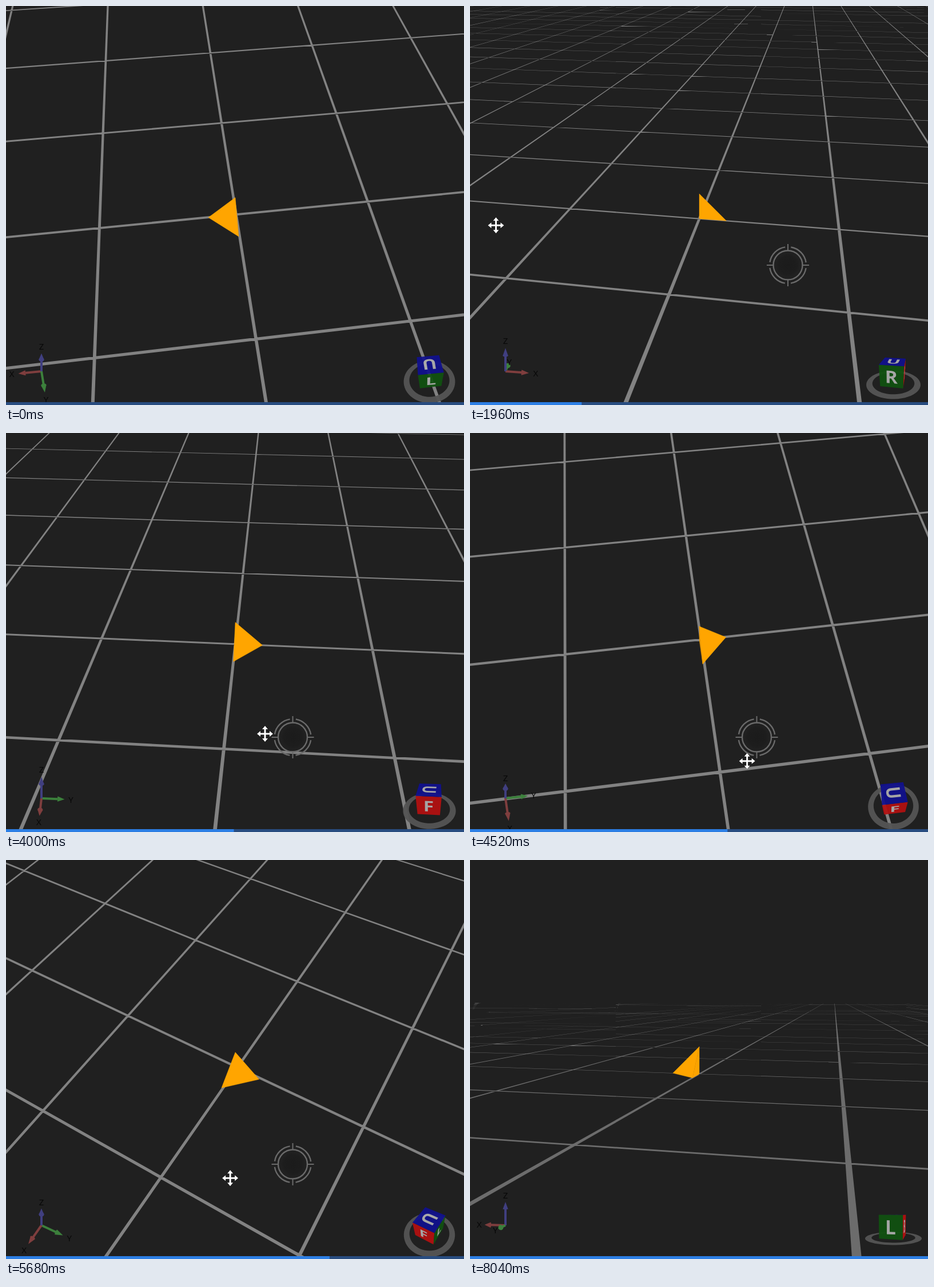
Animation of 801 by 699 pixels, one loop 8080 ms. Source, as an HTML page:

```html
<!DOCTYPE html>
<html lang="en">
<head>
<meta charset="utf-8">
<title>Orbit view</title>
<style>
  html, body { margin: 0; width: 100%; height: 100%; overflow: hidden; background: #202020; }
  svg { display: block; width: 801px; height: 699px; }
  text { font-family: "Noto Sans", "Open Sans", sans-serif; text-anchor: middle; }
  .cube text { font-weight: bold; fill: #b0b0b0; }
</style>
</head>
<body>
<svg viewBox="0 0 801 699">
  <defs>
    <radialGradient id="knob">
      <stop offset="0" stop-color="#1b1b1b"/>
      <stop offset=".75" stop-color="#1d1d1d"/>
      <stop offset="1" stop-color="#1d1d1d" stop-opacity="0"/>
    </radialGradient>
  </defs>
  <rect width="801" height="699" fill="#202020"/>
  <path id="grid"/>
  <g id="solid"></g>
  <g id="triad"></g>
  <path id="ring" fill="#555" fill-rule="evenodd" opacity=".95"/>
  <g id="cube" class="cube" opacity=".93"></g>
  <g id="joystick" fill="none" stroke="#6a6a6a" stroke-width="2.4">
    <circle r="21" fill="url(#knob)" stroke="none"/>
    <circle r="25.5"/>
    <circle r="32" stroke-dasharray="40 10.27" stroke-dashoffset="-5.13"/>
    <path d="M-37 0H-26M26 0H37M0-37V-26M0 26V37" stroke-width="2"/>
  </g>
  <path id="cursor" fill="#fff" stroke="#111" stroke-width="1" paint-order="stroke"
    d="M0-14L5-8H1.5V-1.5H8V-5L14 0L8 5V1.5H1.5V8H5L0 14L-5 8H-1.5V1.5H-8V5L-14 0L-8-5V-1.5H-1.5V-8H-5Z"/>
  <rect y="694" width="801" height="5" fill="#284c80"/>
  <rect id="bar" y="694" height="5" fill="#2c7ee4"/>
</svg>
<script>
const LOOP = 8080, STEP = 40, RAD = Math.PI / 180;
const FOCAL = 964, DISTANCE = 20, CENTER = [401, 351];
const $ = id => document.getElementById(id);

// Each drag: handle position and keys of [time, yaw, pitch, cursor x, cursor y, grid shift].
const drags = [
  { handle: [556, 454], keys: [
    [360, 187.15, 51.1, 556, 454, 1.5],
    [1240, 112.55, 39.6, 363, 422, 2],
    [2060, -14, 24.4, 35, 383, 0]] },
  { handle: [390.5, 459.5], keys: [
    [2480, -14, 24.4, 390, 459, 0],
    [2760, -34.4, 31.7, 337, 478, 0],
    [3260, -75.4, 39.9, 231, 498, 0]] },
  { handle: [501.5, 533], keys: [
    [3680, -75.4, 39.9, 501, 533, 0],
    [4000, -93.9, 37.5, 453, 527, 0],
    [5080, -70.5, 84.9, 520, 628, 6],
    [6520, -201.6, 4.75, 180, 440, 0],
    [6760, -193.65, 6.5, 215, 459, 0]] }
];
const RELEASE = 120;

// Monotone cubic interpolation of one column.
function sample(keys, t, col) {
  const last = keys.length - 1;
  if (t <= keys[0][0]) return keys[0][col];
  if (t >= keys[last][0]) return keys[last][col];
  const slope = i => (keys[i + 1][col] - keys[i][col]) / (keys[i + 1][0] - keys[i][0]);
  const tangent = i => {
    if (i === 0 || i === last) return 0;
    const a = slope(i - 1), b = slope(i);
    return a * b <= 0 ? 0 : 2 * a * b / (a + b);
  };
  let i = 0;
  while (t > keys[i + 1][0]) i++;
  const h = keys[i + 1][0] - keys[i][0], u = (t - keys[i][0]) / h, v = 1 - u;
  return keys[i][col] * v * v * (1 + 2 * u) + keys[i + 1][col] * u * u * (3 - 2 * u)
    + h * u * v * (v * tangent(i) - u * tangent(i + 1));
}

// Returns a function giving [right, up, toward viewer] for a world vector.
function orbit(yaw, pitch) {
  const c = Math.cos(yaw * RAD), s = Math.sin(yaw * RAD);
  const cp = Math.cos(pitch * RAD), sp = Math.sin(pitch * RAD);
  return ([x, y, z]) => {
    const away = x * s + y * c;
    return [x * c - y * s, z * cp + away * sp, z * sp - away * cp];
  };
}

const fix = p => p[0].toFixed(2) + ' ' + p[1].toFixed(2);
const poly = points => 'M' + points.map(fix).join('L') + 'Z';
const area = ([a, b, c]) => (b[0] - a[0]) * (c[1] - a[1]) - (b[1] - a[1]) * (c[0] - a[0]);
const mix = (a, b, k) => a.map((v, i) => v + (b[i] - v) * k);
const sum = (a, b, k) => a.map((v, i) => v + b[i] * k);

function toScreen([r, u, near]) {
  const k = FOCAL / (DISTANCE - near);
  return [CENTER[0] + r * k, CENTER[1] - u * k];
}

function drawGrid(view, shift, pitch) {
  const reach = 250, half = 0.05, clip = DISTANCE - 2;
  const edge = (from, to) => {
    let a = view(from), b = view(to);
    if (a[2] > clip && b[2] > clip) return null;
    if (a[2] > clip) a = mix(a, b, (a[2] - clip) / (a[2] - b[2]));
    else if (b[2] > clip) b = mix(b, a, (b[2] - clip) / (b[2] - a[2]));
    return [toScreen(a), toScreen(b)];
  };
  let d = '';
  for (let k = -reach; k <= reach; k += 5) {
    for (const at of [(along, off) => [along, off, -0.5], (along, off) => [off, along, -0.5]]) {
      const p = edge(at(-reach, k - half), at(reach, k - half));
      const q = edge(at(-reach, k + half), at(reach, k + half));
      if (p && q) {
        const quad = [p[0], p[1], q[1], q[0]];
        d += poly(area(quad) + area([quad[0], quad[2], quad[3]]) > 0 ? quad : quad.reverse());
      }
    }
  }
  const gray = Math.round(106 + 24 * Math.min(1, Math.max(0, (pitch - 5) / 18)));
  $('grid').setAttribute('d', d);
  $('grid').setAttribute('fill', `rgb(${gray},${gray},${gray})`);
  $('grid').setAttribute('transform', `translate(${shift} ${-0.35 * shift})`);
}

function drawSolid(view) {
  const base = [0, 0, -0.5], top = [0, 0, 0.5], x = [1, 0, -0.5], y = [0, 1, -0.5];
  const n = 1 / Math.sqrt(3);
  // Corners, normal and ambient light of each visible face.
  const faces = [
    [[base, y, top], [-1, 0, 0], 0.88],
    [[base, x, top], [0, -1, 0], 0.88],
    [[x, y, top], [n, n, n], 0.78]];
  $('solid').innerHTML = faces.map(([points, normal, ambient]) => {
    const seen = points.map(view), facing = view(normal);
    const eye = sum([0, 0, DISTANCE], seen[0], -1);
    if (facing.reduce((s, v, i) => s + v * eye[i], 0) <= 0) return '';
    const lit = Math.min(1, ambient + 0.45 * facing[2]);
    const color = `rgb(${Math.round(255 * lit)},${Math.round(165 * lit)},0)`;
    return `<path d="${poly(seen.map(toScreen))}" fill="${color}" stroke="${color}" stroke-width=".4"/>`;
  }).join('');
}

function drawTriad(view) {
  const origin = [62, 640], size = 40;
  const axes = [['X', [1, 0, 0], '#7f3e3e'], ['Y', [0, 1, 0], '#3c803c'], ['Z', [0, 0, 1], '#403f80']];
  const items = axes.map(([name, dir, color]) => {
    const v = view(dir);
    const at = k => {
      const s = size * k / (1 - k * v[2] / 3.8);
      return [origin[0] + v[0] * s, origin[1] - v[1] * s];
    };
    const neck = at(0.7), tip = at(1), label = at(1.27);
    const len = Math.hypot(v[0], v[1]) || 1;
    const side = [v[1] / len * 4.6, v[0] / len * 4.6];
    const turn = Math.atan2(-v[1], v[0]) / RAD;
    const cone = poly([tip, sum(neck, side, 1), sum(neck, side, -1)]);
    return { near: v[2], svg:
      `<path d="M${fix(origin)}L${fix(neck)}" stroke="${color}" stroke-width="4"/>
       <path d="${cone}" fill="${color}"/>
       <ellipse rx="${4.6 * Math.abs(v[2])}" ry="4.6" fill="${color}"
         transform="translate(${fix(neck)}) rotate(${turn})"/>
       <text x="${label[0]}" y="${label[1] + 5.4}" font-size="15" fill="#080808">${name}</text>` };
  });
  $('triad').innerHTML = items.sort((a, b) => a.near - b.near).map(i => i.svg).join('');
}

function drawCube(view) {
  const unit = 19.3, far = 9, mid = [740.5, 641];
  const project = p => {
    const v = view(p), k = unit * far / (far - v[2]);
    return [mid[0] + v[0] * k, mid[1] - v[1] * k];
  };
  const circle = r => poly(Array.from({ length: 60 }, (_, i) =>
    project([r * Math.cos(i * 6 * RAD), r * Math.sin(i * 6 * RAD), -1])));
  $('ring').setAttribute('d', circle(2.5) + circle(1.96));

  const up = [0, 0, 1], green = '#105210', red = '#b41010', blue = '#10108e';
  const faces = [
    ['F', [1, 0, 0], [0, 1, 0], up, red], ['B', [-1, 0, 0], [0, -1, 0], up, red],
    ['L', [0, 1, 0], [-1, 0, 0], up, green], ['R', [0, -1, 0], [1, 0, 0], up, green],
    ['U', up, [1, 0, 0], [0, 1, 0], blue]];
  $('cube').innerHTML = faces.map(([name, normal, right, rise, color]) => {
    const corners = [[-1, -1], [1, -1], [1, 1], [-1, 1]]
      .map(([a, b]) => project(sum(sum(normal, right, a), rise, b)));
    if (area(corners) >= 0) return '';
    const slope = dir => sum(project(sum(normal, dir, 0.2)), project(sum(normal, dir, -0.2)), -1)
      .map(v => v / 0.4 / 20);
    const ex = slope(right), ey = slope(rise), c = project(normal);
    return `<path d="${poly(corners)}" fill="${color}"/>
      <text font-size="32" y="11.5" transform="matrix(${[...ex, -ey[0], -ey[1], ...c]})">${name}</text>`;
  }).join('');
}

function place(id, shown, [x, y]) {
  $(id).setAttribute('visibility', shown ? 'visible' : 'hidden');
  $(id).setAttribute('transform', `translate(${x} ${y})`);
}

function draw(t) {
  const drag = drags.filter(d => t >= d.keys[0][0]).pop() || drags[0];
  const [yaw, pitch, x, y, shift] = [1, 2, 3, 4, 5].map(col => sample(drag.keys, t, col));
  const held = t >= drag.keys[0][0] && t <= drag.keys[drag.keys.length - 1][0] + RELEASE;
  const view = orbit(yaw, pitch);
  drawGrid(view, shift, pitch);
  drawSolid(view);
  drawTriad(view);
  drawCube(view);
  place('joystick', held, drag.handle);
  place('cursor', held, [x, y]);
  $('bar').setAttribute('width', 801 * t / (LOOP - STEP));
}

const start = performance.now();
let shown = -1;
function tick() {
  const t = Math.floor((performance.now() - start) % LOOP / STEP) * STEP;
  if (t !== shown) draw(shown = t);
  requestAnimationFrame(tick);
}
tick();
</script>
</body>
</html>
```
